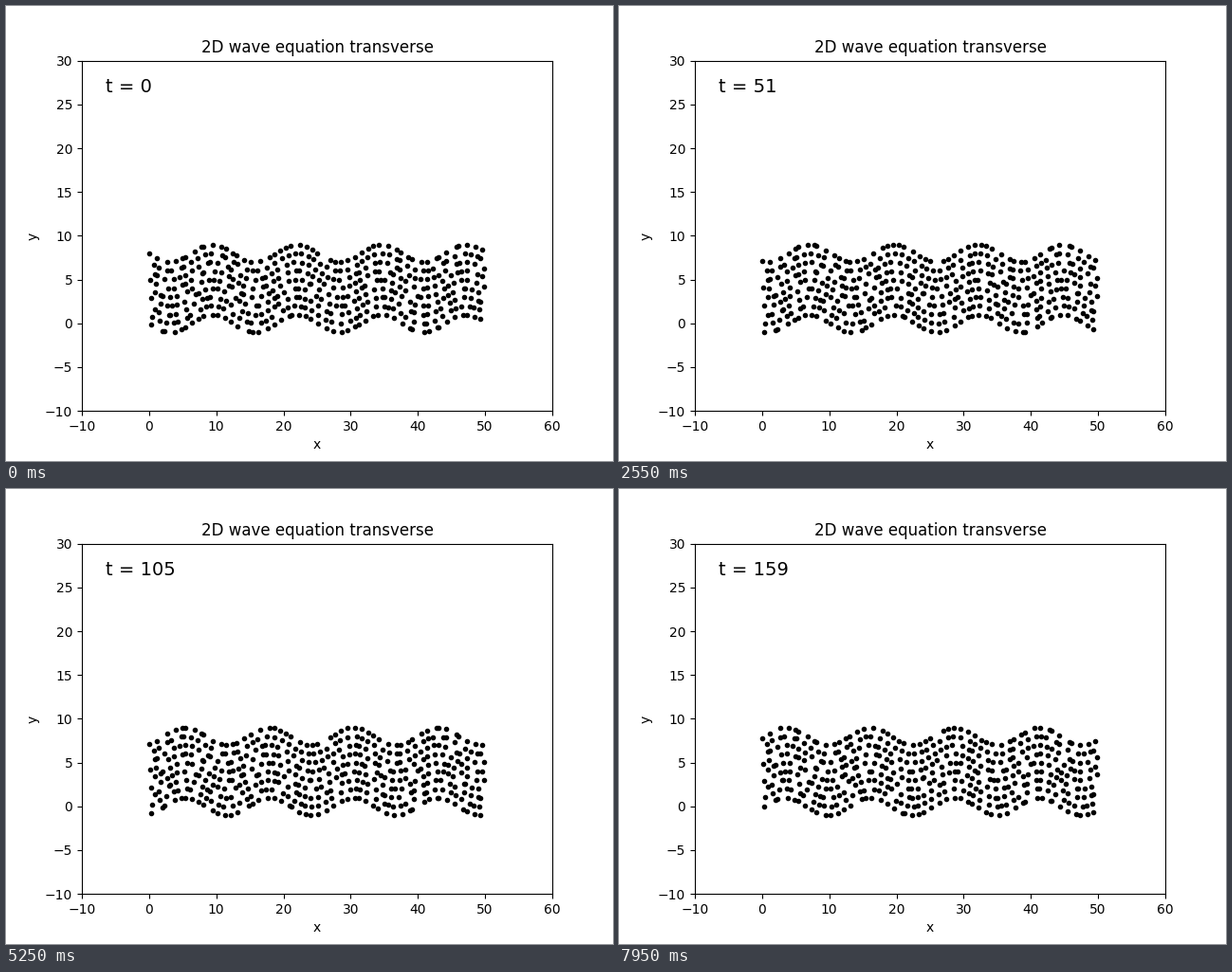
Recreate the animation shown at these times as a matplotlib script. Size 640x480 px, loop 8 s.

```python
import numpy as np
import matplotlib.pyplot as plt
from matplotlib.animation import FuncAnimation

COLS, ROWS = 50, 9
FRAMES, INTERVAL = 160, 50
AMPLITUDE, K, OMEGA = 1.0, 0.5, 0.1

# One particle per unit cell, shifted sideways at random inside its cell
rng = np.random.default_rng(8)
x = (np.arange(COLS) + rng.random((ROWS, COLS))).ravel()
y0 = np.repeat(np.arange(ROWS), COLS)

fig, ax = plt.subplots(figsize=(6.4, 4.8), dpi=100)
ax.set(xlim=(-10, 60), ylim=(-10, 30), xlabel="x", ylabel="y",
       title="2D wave equation transverse")
dots, = ax.plot([], [], "ko", markersize=3)
label = ax.text(0.05, 0.95, "", transform=ax.transAxes,
                fontsize=14, va="top")


def update(t):
    dots.set_data(x, y0 + AMPLITUDE * np.sin(OMEGA * t - K * x))
    label.set_text(f"t = {t}")
    return dots, label


anim = FuncAnimation(fig, update, frames=FRAMES, interval=INTERVAL,
                     repeat=True, repeat_delay=0)
plt.show()
```
